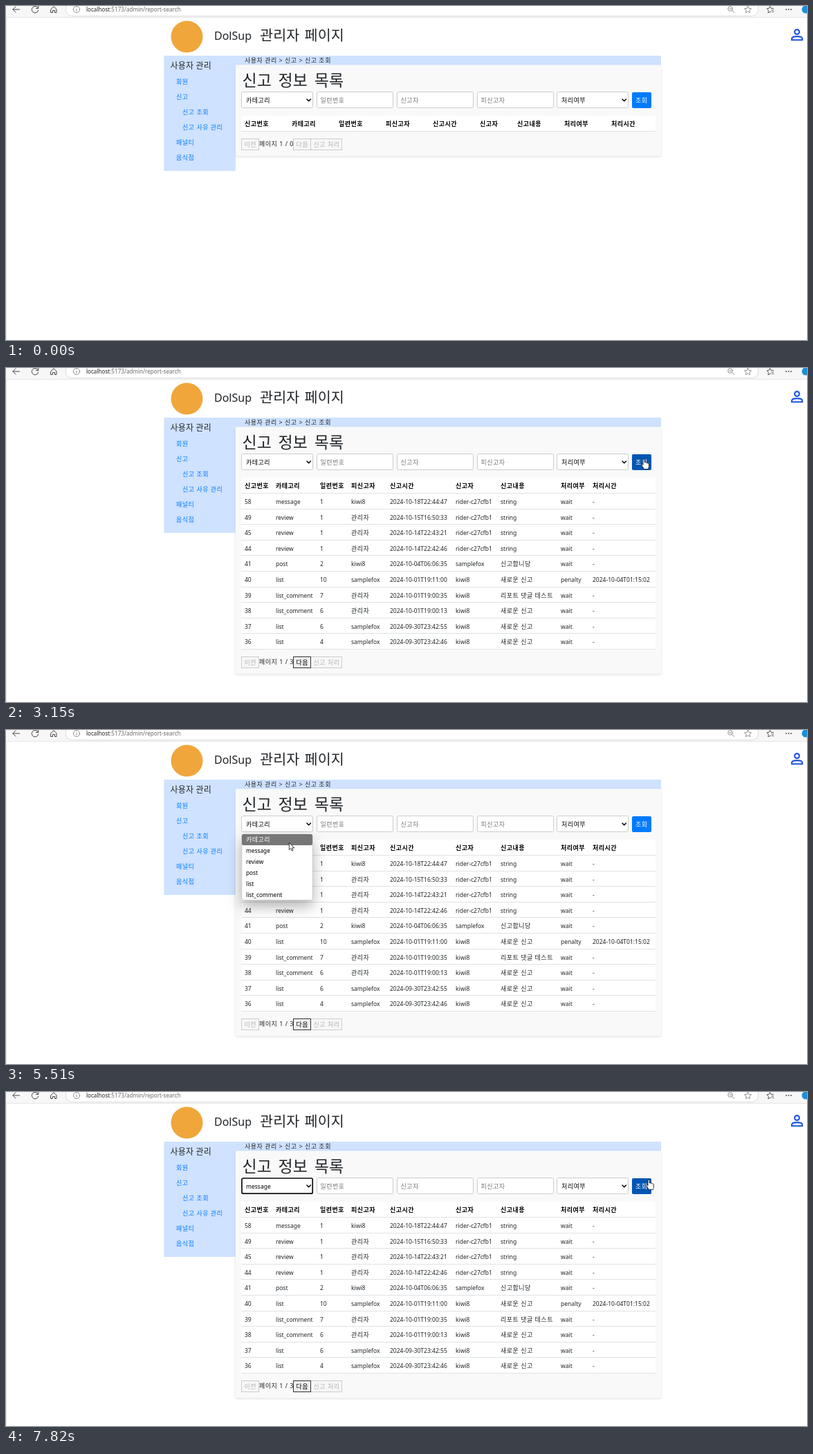
Animation, 1158 px wide and 484 px high, one loop 8000 ms. Source, as an HTML page:

```html
<!DOCTYPE html>
<html lang="ko">
<head>
<meta charset="utf-8">
<title>관리자 페이지</title>
<style>
html, body { margin: 0; width: 100%; height: 100%; overflow: hidden; background: #fff; }
svg { display: block; width: 1158px; height: 484px; }
text { font: 8.5px "Noto Sans", "Noto Sans CJK KR", sans-serif; fill: #212529; white-space: pre; }
.ko { font-size: 9px; letter-spacing: .5px; }
.h1 { font-size: 23px; font-weight: 350; letter-spacing: .1px; word-spacing: 3.5px; }
.h2 { font-size: 20.7px; font-weight: 350; letter-spacing: .1px; word-spacing: 1.7px; }
.brand { font-size: 16px; }
.side { font-size: 12px; font-weight: 350; letter-spacing: .2px; }
.url { font-size: 8.1px; fill: #6b6b6b; }
.bold { font-weight: 700; }
.black { fill: #000; }
.link { fill: #007bff; }
.hint { fill: #757575; }
.off { fill: #b4b4b4; }
.white { fill: #fff; }
.box { fill: #fff; stroke: #ccc; }
.icon { fill: none; stroke: #444; stroke-linecap: round; stroke-linejoin: round; }
.panel { fill: #f9f9f9; filter: drop-shadow(0 1px 1.5px rgba(0,0,0,.14)); }
.menu { fill: #fff; stroke: #b5b5b5; stroke-width: .6; filter: drop-shadow(0 9px 10px rgba(0,0,0,.3)); }
#list text:not(.ko) { font-size: 8.3px; }

#empty, #full, #list, #pick0, #pick1, #before, #after, #arrow, #hand, #ring {
  animation: 8s step-end infinite;
}
#empty { animation-name: empty; }
#full { animation-name: full; }
#list { animation-name: list; }
#pick0 { animation-name: pick0; }
#pick1 { animation-name: pick1; }
#before { animation-name: before; }
#after { animation-name: after; }
#arrow { animation-name: arrow; }
#hand { animation-name: hand; }
#ring { animation-name: ring; }
#find { animation: find 8s steps(3) infinite; }
#cursor { animation: move 8s step-end infinite; }

@keyframes empty { 0% { opacity: 1 } 30.875%, 100% { opacity: 0 } }
@keyframes full { 0% { opacity: 0 } 30.875%, 100% { opacity: 1 } }
@keyframes list { 0% { opacity: 0 } 66.375% { opacity: 1 } 83.875%, 100% { opacity: 0 } }
@keyframes pick0 { 0% { opacity: 1 } 69.7%, 100% { opacity: 0 } }
@keyframes pick1 { 0% { opacity: 0 } 69.7%, 100% { opacity: 1 } }
@keyframes before { 0% { opacity: 1 } 83.875%, 100% { opacity: 0 } }
@keyframes after { 0% { opacity: 0 } 83.875%, 100% { opacity: 1 } }
@keyframes arrow {
  0% { opacity: 1 } 12.5% { opacity: 0 } 40.25% { opacity: 1 } 95.125%, 100% { opacity: 0 }
}
@keyframes hand {
  0% { opacity: 0 } 12.5% { opacity: 1 } 40.25% { opacity: 0 } 95.125%, 100% { opacity: 1 }
}
@keyframes ring {
  0% { opacity: 0 } 22.625% { opacity: 1 } 24.25% { opacity: 0 }
  65.5% { opacity: 1 } 67.25% { opacity: 0 }
  83% { opacity: 1 } 84.625%, 100% { opacity: 0 }
}
@keyframes find {
  0%, 12.5% { fill: #007bff } 15.125%, 40.25% { fill: #0056b3 }
  42.875%, 95.125% { fill: #007bff } 97.75%, 100% { fill: #0056b3 }
}
@keyframes move {
  0% { transform: translate(1138px, 500px) }
  .625% { transform: translate(1138px, 500px); animation-timing-function: steps(3) }
  3.625% { transform: translate(1085px, 300px); animation-timing-function: steps(4) }
  7.75% { transform: translate(960px, 74px); animation-timing-function: steps(3) }
  10.875% { transform: translate(912px, 114px) }
  11.625% { transform: translate(912px, 114px); animation-timing-function: steps(2) }
  13.375% { transform: translate(923px, 129px) }
  26.75% { transform: translate(923px, 130px) }
  39.375% { transform: translate(922px, 132px); animation-timing-function: steps(6) }
  44.625% { transform: translate(480px, 176px); animation-timing-function: steps(2) }
  46.375% { transform: translate(343px, 181px); animation-timing-function: steps(2) }
  48.125% { transform: translate(412px, 134px) }
  59.75% { transform: translate(412px, 135px) }
  66.375% { transform: translate(412px, 135px); animation-timing-function: steps(3) }
  68.875% { transform: translate(409px, 163px); animation-timing-function: steps(3) }
  71.375% { transform: translate(401px, 178px) }
  84.625% { transform: translate(401px, 178px); animation-timing-function: steps(4) }
  88.25% { transform: translate(600px, 182px); animation-timing-function: steps(5) }
  92.5% { transform: translate(835px, 174px); animation-timing-function: steps(3) }
  95.125% { transform: translate(908px, 142px); animation-timing-function: steps(3) }
  97.75%, 100% { transform: translate(929px, 127px) }
}
</style>
</head>
<body>
<svg viewBox="0 0 1158 484">
  <!-- browser bar -->
  <rect width="1158" height="16.5" fill="#f7f7f7"/>
  <path d="M0 16.5H1158M.5 16V484" stroke="#e6e6e6"/>
  <rect x="86.5" y="-6" width="1001" height="20.5" rx="9" fill="#fff" stroke="#dcdcdc"/>
  <g class="icon">
    <path d="M19.500 5H10M14 .8L9.800 5L14 9.200"/>
    <path d="M46.500 3.200A4.800 4.800 0 1 0 46.800 6.200M46.800 .3V3.500H43.500"/>
    <path d="M65 4.500L69 .8L73 4.500V9.500H70.500V6.500H67.500V9.500H65Z"/>
    <g stroke="#777" stroke-width=".8">
      <circle cx="102" cy="5" r="4.600"/><path d="M102 4.500V7.300M102 2.700V2.800"/>
      <circle cx="1047" cy="4" r="3.300"/><path d="M1049.500 6.500L1052.500 9.500M1045.500 4H1048.500"/>
      <path d="M1072.500 0L1074 3.400L1077.500 3.800L1074.900 6.200L1075.600 9.700L1072.500 8L1069.400 9.700L1070.100 6.200L1067.500 3.800L1071 3.400Z"/>
    </g>
    <path stroke-width=".9" d="M1106 8L1101.800 9.800L1102.300 6.300L1100 3.800L1103 3.400L1104.500 .3L1106 3.400H1109.500M1107 6H1109.500M1108 8.500H1109.500"/>
    <path stroke-width="1.800" d="M1128 5h0M1131.500 5h0M1135 5h0"/>
  </g>
  <circle cx="1156" cy="5" r="5.500" fill="#1c8fd6"/>

  <!-- header -->
  <circle cx="261.500" cy="44.500" r="23" fill="#f0a63a"/>
  <g fill="none" stroke="#1f55e0" stroke-width="2.100">
    <circle cx="1143.500" cy="37.500" r="3.400"/>
    <path d="M1136 49.200V47.500C1136 43 1151.200 43 1151.200 47.500V49.200Z"/>
  </g>
  <path d="M228.500 72H947V85.500H331.800V239H228.500Z" fill="#cfe2ff"/>

  <g id="empty"></g>
  <g id="full"></g>
  <g id="form"></g>
  <g id="before"></g>
  <g id="after"></g>
  <g id="list"></g>

  <g id="cursor">
    <circle id="ring" r="7.500" fill="#d6d00f" fill-opacity=".7"/>
    <path id="arrow" d="M.4 .4V10.600L2.700 8.500L4.400 12.200L6.100 11.400L4.500 7.800H7.700Z" fill="#fff" stroke="#111" stroke-width=".8"/>
    <path id="hand" d="M-1 1C-1 -.4 1.200 -.4 1.200 1V5C1.800 4.200 3.300 4.500 3.400 5.500C4.200 4.700 5.400 5.200 5.500 6.200C6.500 5.500 7.500 6.200 7.500 7.200V10.500C7.500 12 6.500 12.500 6.500 14.500H.2C0 12.500 -2.800 10.500 -3 8.500C-3 7.200 -1.700 7.300 -1 8.500Z" fill="#fff" stroke="#111" stroke-width=".8"/>
  </g>
</svg>
<script>
const NS = 'http://www.w3.org/2000/svg';
const get = id => document.getElementById(id);

function add(parent, tag, attrs) {
  const node = document.createElementNS(NS, tag);
  for (const key in attrs) node.setAttribute(key, attrs[key]);
  return parent.appendChild(node);
}

function text(parent, x, y, str, cls = '') {
  const ko = /[가-힣]/.test(str) ? 'ko ' : '';
  add(parent, 'text', { x, y, class: ko + cls }).textContent = str;
}

function rect(parent, x, y, width, height, attrs) {
  return add(parent, 'rect', { x, y, width, height, ...attrs });
}

function chevron(parent, x) {
  add(parent, 'path', { d: `M${x} 135l2.700 2.700l2.700 -2.700`, class: 'icon', style: 'stroke:#000;stroke-width:1.5' });
}

function panel(id, cols, rows, pages) {
  const g = get(id), base = 181.5, pitch = 22.6;
  const end = base + rows.length * pitch;
  rect(g, 331.8, 85.5, 615.2, end + 36 - 85.5, { rx: 3, class: 'panel' });
  rect(g, 340, 159, 599, end - 159, { fill: '#fff' });
  heads.forEach((head, i) => text(g, cols[i], 174, head, 'bold black'));
  for (let i = 0; i <= rows.length; i++) {
    rect(g, 340, Math.round(base - .5 + i * pitch), 599, 1, { fill: '#dee2e6' });
  }
  rows.forEach((row, r) => row.split('|').forEach((cell, i) =>
    text(g, cols[i], 197 + r * pitch, cell)));

  const top = end + 11;
  const button = (x, width, label, on) => {
    rect(g, x + .5, top, width - 1, 16, { fill: on ? '#efefef' : '#f7f7f7', stroke: on ? '#333' : '#ccc' });
    text(g, x + 4.5, top + 11.3, label, on ? 'black' : 'off');
  };
  button(340, 26, '이전');
  text(g, 366, top + 10.6, '페이지 1 / ' + pages);
  button(440, 46, '신고 처리');
  button(415, 26, '다음', pages > 0);
}

const heads = ['신고번호', '카테고리', '일련번호', '피신고자', '신고시간', '신고자', '신고내용', '처리여부', '처리시간'];
const admin = '관리자', ann = 'kiwi8', bob = 'samplefox', guest = 'rider-c27cfb1';
const rows = [
  `58|message|1|${ann}|2024-10-18T22:44:47|${guest}|string|wait|-`,
  `49|review|1|${admin}|2024-10-15T16:50:33|${guest}|string|wait|-`,
  `45|review|1|${admin}|2024-10-14T22:43:21|${guest}|string|wait|-`,
  `44|review|1|${admin}|2024-10-14T22:42:46|${guest}|string|wait|-`,
  `41|post|2|${ann}|2024-10-04T06:06:35|${bob}|신고합니당|wait|-`,
  `40|list|10|${bob}|2024-10-01T19:11:00|${ann}|새로운 신고|penalty|2024-10-04T01:15:02`,
  `39|list_comment|7|${admin}|2024-10-01T19:00:35|${ann}|리포트 댓글 테스트|wait|-`,
  `38|list_comment|6|${admin}|2024-10-01T19:00:13|${ann}|새로운 신고|wait|-`,
  `37|list|6|${bob}|2024-09-30T23:42:55|${ann}|새로운 신고|wait|-`,
  `36|list|4|${bob}|2024-09-30T23:42:46|${ann}|새로운 신고|wait|-`
];
panel('empty', [345, 413, 481, 549, 617, 685, 739, 807, 875], [], 0);
panel('full', [345, 390, 454, 499, 555, 650, 715, 802, 848], rows, 3);

// page text and search form
const form = get('form');
text(form, 116, 8, 'localhost:5173/admin/report-search', 'url');
form.lastChild.innerHTML = '<tspan fill="#222">localhost</tspan>:5173/admin/report-search';
text(form, 301, 49, 'DolSup', 'brand');
text(form, 367, 50.3, '관리자 페이지', 'h2');
text(form, 237.5, 91.3, '사용자 관리', 'side');
['회원', '신고', ' 신고 조회', ' 신고 사유 관리', '패널티', '음식점'].forEach((label, i) =>
  text(form, label[0] === ' ' ? 255 : 246, 113 + i * 22, label.trim(), 'link'));
text(form, 345, 82.3, '사용자 관리 > 신고 > 신고 조회');
text(form, 341.5, 116, '신고 정보 목록', 'h1');

const field = (x, width) => rect(form, x, 124.5, width, 23, { rx: 2, class: 'box' });
field(340.5, 103);
[[449.5, '일련번호'], [565.5, '신고자'], [681.5, '피신고자']].forEach(([x, label]) => {
  field(x, 110);
  text(form, x + 5, 140.3, label, 'hint');
});
field(796.5, 103);
text(form, 803, 140.3, '처리여부', 'black');
chevron(form, 891);
rect(form, 905, 125, 28, 23, { rx: 2, id: 'find' });
text(form, 910, 140.3, '조회', 'white');

text(get('before'), 347, 140.3, '카테고리', 'black');
chevron(get('before'), 435);
rect(get('after'), 341, 125, 102.2, 22.2, { rx: 2, fill: '#fff', stroke: '#101010', 'stroke-width': 1.7 });
text(get('after'), 347, 140.3, 'message', 'black');
chevron(get('after'), 435);

// option list
const list = get('list');
const options = ['카테고리', 'message', 'review', 'post', 'list', 'list_comment'];
rect(list, 340.8, 151, 102.5, 95.5, { rx: 3, class: 'menu' });
options.forEach((label, i) => text(list, 347, 162.2 + i * 16, label, 'black'));
for (const i of [0, 1]) {
  const g = add(list, 'g', { id: 'pick' + i });
  rect(g, 341, 151 + i * 16, 102, 16, { rx: i ? 0 : 2, fill: '#767676' });
  text(g, 347, 162.2 + i * 16, options[i], 'white');
}
</script>
</body>
</html>
```
